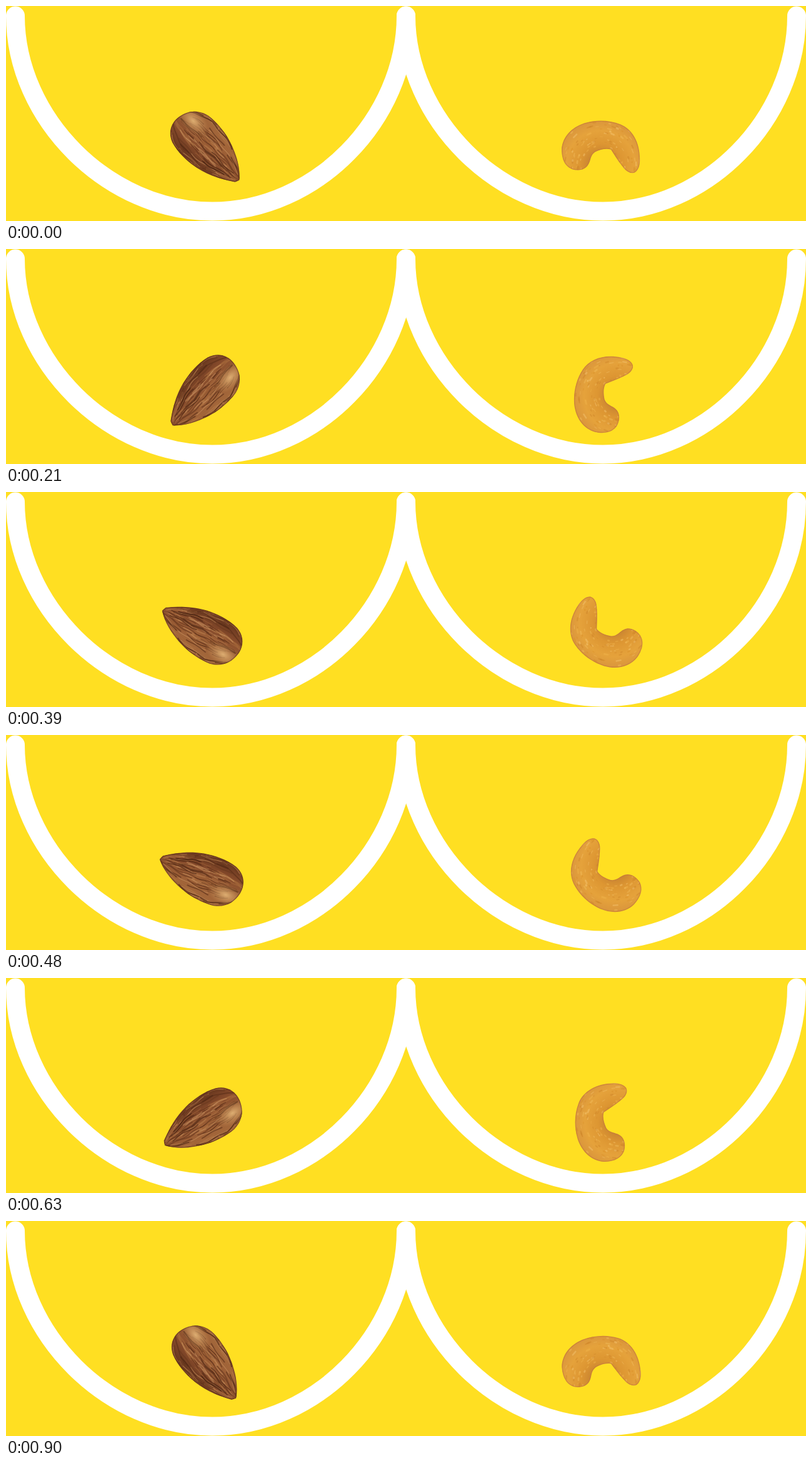
Animation of 1280x344 px, one loop 930 ms. Source, as an HTML page:

```html
<!DOCTYPE html>
<html lang="en">
<head>
<meta charset="utf-8">
<title>Rocking nuts</title>
<style>
  html, body { margin: 0; width: 100%; height: 100%; overflow: hidden; background: #ffdf22; }
  svg { display: block; width: 100%; height: 100%; }
</style>
</head>
<body>
<svg viewBox="0 0 1280 344" preserveAspectRatio="none">
  <defs>
    <path id="bowl" d="M15 15.5C15 181 164 328.5 330 328.5S640 181 640 15.5"/>
    <path id="almondShape" d="M77 0C60-20 38-29 20-35C4-40-16-42-30-40C-50-36-60-22-63-6C-66 10-58 25-42 31C-24 37-2 36 14 33C40 28 60 16 74 7Z"/>
    <path id="cashewShape" d="M15-60C28-61 37-56 37-48C36-40 31-36 25-31C17-24 8-18 1-13C-1-5 2 4 6 12C12 20 20 18 27 22C35 26 38 36 36 46C33 58 22 65 4 66C-16 65-31 52-39 32C-46 12-46-8-40-26C-33-46-12-59 15-60Z"/>
    <clipPath id="almondClip"><use href="#almondShape"/></clipPath>
    <clipPath id="cashewClip"><use href="#cashewShape"/></clipPath>
    <linearGradient id="almondFill" x1="0" y1="0" x2="0" y2="1">
      <stop offset="0" stop-color="#a56a3c"/>
      <stop offset=".35" stop-color="#9c5f36"/>
      <stop offset=".7" stop-color="#84492a"/>
      <stop offset="1" stop-color="#64351d"/>
    </linearGradient>
    <radialGradient id="shine">
      <stop offset="0" stop-color="#e8bb7c" stop-opacity=".85"/>
      <stop offset="1" stop-color="#d09a5c" stop-opacity="0"/>
    </radialGradient>
    <radialGradient id="cashewFill" gradientUnits="userSpaceOnUse" cx="26" cy="2" r="84">
      <stop offset=".2" stop-color="#c98431"/>
      <stop offset=".4" stop-color="#dd9632"/>
      <stop offset=".65" stop-color="#e5a23b"/>
      <stop offset="1" stop-color="#d28d3d"/>
    </radialGradient>
  </defs>

  <rect width="1280" height="344" fill="#ffdf22"/>
  <g fill="none" stroke="#fff" stroke-width="30" stroke-linecap="round">
    <use href="#bowl"/>
    <use href="#bowl" x="625"/>
  </g>

  <g id="almond">
    <g clip-path="url(#almondClip)">
      <use href="#almondShape" fill="url(#almondFill)"/>
      <g id="grain" fill="none" stroke-linecap="round"></g>
      <ellipse cx="-42" cy="-17" rx="30" ry="17" fill="url(#shine)"/>
      <use href="#almondShape" fill="none" stroke="#5c2f18" stroke-opacity=".5" stroke-width="3"/>
    </g>
  </g>

  <g id="cashew">
    <g clip-path="url(#cashewClip)">
      <use href="#cashewShape" fill="url(#cashewFill)"/>
      <g id="flecks" fill="none" stroke-linecap="round"></g>
      <use href="#cashewShape" fill="none" stroke="#c57b3c" stroke-opacity=".6" stroke-width="3"/>
    </g>
  </g>
</svg>

<script>
const LOOP = 930, STEP = 30;
const TOP = 422, BOTTOM = 923;   // turning points of the swing, ms

const $ = id => document.getElementById(id);

let seed = 7;
const random = () => (seed = seed * 16807 % 2147483647) / 2147483647;
const between = (a, b) => a + (b - a) * random();
const pick = list => list[Math.floor(random() * list.length)];

function addStroke(parent, points, color, width, opacity) {
  const line = document.createElementNS("http://www.w3.org/2000/svg", "path");
  line.setAttribute("d", "M" + points.map(p => p.map(n => n.toFixed(1)).join(" ")).join("L"));
  line.setAttribute("stroke", color);
  line.setAttribute("stroke-width", width);
  line.setAttribute("stroke-opacity", opacity);
  parent.append(line);
}

// Wrinkles follow the almond's length and gather at both ends.
function drawGrain() {
  for (let i = 0; i < 110; i++) {
    const lane = between(-1, 1), phase = between(0, 6);
    const start = between(-66, 48), end = start + between(18, 60);
    const points = [];
    for (let x = start; x < Math.min(end, 76); x += 4) {
      const u = (x + 66) / 143;
      const half = 40 * Math.pow(Math.sin(Math.PI * Math.pow(u, .72)), .65);
      points.push([x, lane * half - 3 * (1 - u) + 1.3 * Math.sin(x / 7 + phase)]);
    }
    const dark = random() < .57;
    const color = dark ? pick(["#4b2412", "#5c301a", "#6b3a20"]) : pick(["#bd8450", "#cb9460", "#aa6c3c"]);
    if (points.length > 1) addStroke(drawGrain.layer, points, color, between(.8, 2.1).toFixed(1), dark ? .65 : .5);
  }
}

// Short pale and dark marks scattered along the cashew's bend.
function drawFlecks() {
  for (let i = 0; i < 130; i++) {
    const angle = between(1.2, 5.1), radius = between(30, 72), turn = between(.02, .12);
    const at = a => [26 + radius * Math.cos(a), 2 + radius * .95 * Math.sin(a)];
    const color = pick(["#f3c674", "#efba5c", "#f0b44d", "#cd8429", "#d98f27"]);
    addStroke($("flecks"), [at(angle), at(angle + turn)], color, between(.8, 3).toFixed(1), .45);
  }
}

drawGrain.layer = $("grain");
drawGrain();
drawFlecks();

// Share of the swing, 0 to 1: a quicker way out and a slower way back.
function swing(time) {
  const rise = TOP + LOOP - BOTTOM;
  const since = (time + LOOP - BOTTOM) % LOOP;
  return since < rise ? since / rise : (LOOP - since) / (LOOP - rise);
}

function pose(id, x, y, degrees) {
  $(id).setAttribute("transform", `translate(${x} ${y}) rotate(${degrees})`);
}

const begin = performance.now();
function draw() {
  const elapsed = Math.max(0, performance.now() - begin) % LOOP;
  const share = swing(Math.floor(elapsed / STEP) * STEP);
  pose("almond", 318, 225.3, 41 + 180 * share);
  pose("cashew", 955, 228, 95.5 - 160 * share);
  requestAnimationFrame(draw);
}
draw();
</script>
</body>
</html>
```
